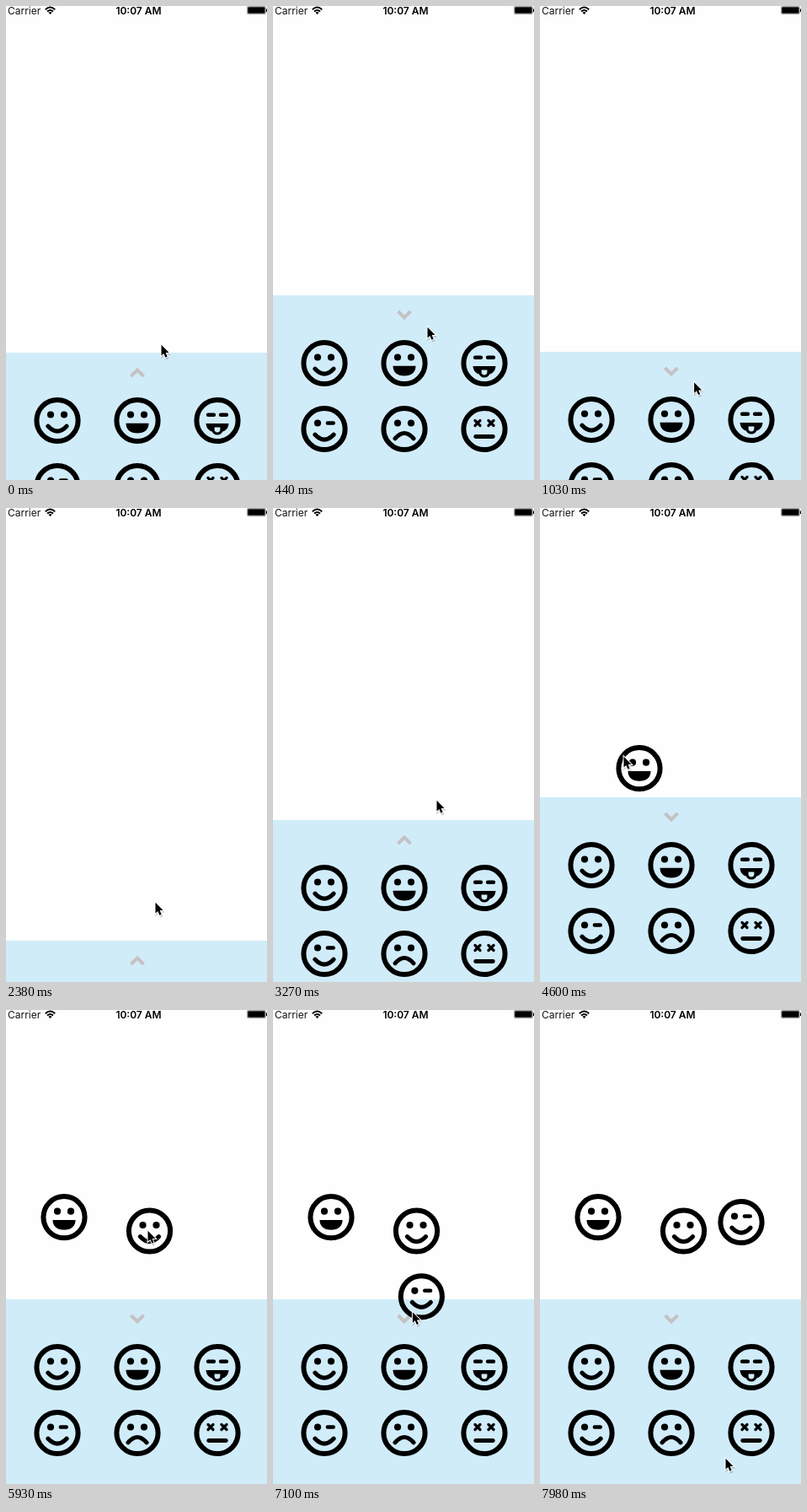
An HTML page that plays this animation: 310 by 562 pixels, repeating every 8000 ms.

```html
<!DOCTYPE html>
<html lang="en">
<head>
<meta charset="utf-8">
<title>Emoji tray</title>
<style>
  html, body { margin: 0; width: 100%; height: 100%; overflow: hidden; background: #fefefe; }
  svg { display: block; width: 310px; height: 562px; }
  text { font: 12px Inter, "Open Sans", sans-serif; }
  .bold { font-weight: 600; text-anchor: middle; }
  .line { fill: none; stroke: #000; stroke-linecap: round; stroke-linejoin: round; }
</style>
</head>
<body>
<svg viewBox="0 0 310 562">
  <defs>
    <circle id="ring" r="24.6" fill="none" stroke="#000" stroke-width="6"/>
    <circle id="eye" r="4.1"/>
    <path id="dash" class="line" stroke-width="4.5" d="M-3.4 0H3.4"/>
    <path id="cross" class="line" stroke-width="3.2" d="M-3-3L3 3M3-3L-3 3"/>
    <path id="curve" class="line" stroke-width="5.2" d="M-11 6.7Q0 18.5 11 6.7"/>
    <g id="eyes"><use href="#eye" x="-8" y="-7"/><use href="#eye" x="8" y="-7"/></g>

    <g id="smile"><use href="#ring"/><use href="#eyes"/><use href="#curve"/></g>
    <g id="grin">
      <use href="#ring"/><use href="#eyes"/>
      <path d="M-13.5 3.2H13.5C13.5 10.5 8.5 15 0 15S-13.5 10.5-13.5 3.2Z"/>
    </g>
    <g id="tongue">
      <use href="#ring"/>
      <use href="#dash" x="-7.5" y="-6.8"/><use href="#dash" x="7.5" y="-6.8"/>
      <path d="M-13.5 3.5H13.5C13 8.5 10.5 12 6.5 13H-6.5C-10.5 12-13 8.5-13.5 3.5Z"/>
      <path d="M-5 6.5H5V10.5A5 5 0 0 1-5 10.5Z" fill="#d1ecf9" stroke="#000" stroke-width="3.2"/>
    </g>
    <g id="wink">
      <use href="#ring"/><use href="#eye" x="-8" y="-7"/><use href="#dash" x="7.3" y="-7"/><use href="#curve"/>
    </g>
    <g id="sad">
      <use href="#ring"/><use href="#eyes"/>
      <path class="line" stroke-width="5" d="M-11 11.3Q0-1.5 11 11.3"/>
    </g>
    <g id="dead">
      <use href="#ring"/>
      <use href="#cross" x="-8" y="-7"/><use href="#cross" x="8" y="-7"/>
      <path class="line" stroke-width="4.8" d="M-10.3 9H10.3"/>
    </g>
  </defs>

  <rect width="310" height="562" fill="#fefefe"/>

  <text x="2" y="10" fill="#111">Carrier</text>
  <path d="M46.8 4.2Q52.5-1 58.2 4.2M49 6.5Q52.5 3.4 56 6.5" fill="none" stroke="#000" stroke-width="1.9"/>
  <path d="M50.4 7.7L52.5 9.9L54.6 7.7Q52.5 6.1 50.4 7.7Z"/>
  <text class="bold" x="157.5" y="10">10:07 AM</text>
  <rect x="286.4" y=".4" width="22" height="9.2" rx="1.5" fill="none" stroke="#888" stroke-width=".8"/>
  <rect x="287.2" y="1.2" width="20.4" height="7.6" rx=".8"/>
  <path d="M309 3.5H310V7H309Z"/>

  <g id="panel">
    <rect width="310" height="562" fill="#d1ecf9"/>
    <path id="chevron" fill="none" stroke="#c4c2c4" stroke-width="4"/>
    <use href="#smile" x="61" y="80.5"/>
    <use href="#grin" x="156" y="80.5"/>
    <use href="#tongue" x="251" y="80.5"/>
    <use href="#wink" x="61" y="158.5"/>
    <use href="#sad" x="156" y="158.5"/>
    <use href="#dead" x="251" y="158.5"/>
  </g>

  <use id="grinCopy" href="#grin"/>
  <use id="smileCopy" href="#smile"/>
  <use id="winkCopy" href="#wink"/>

  <g id="cursor">
    <path d="M0 2V17L4 14L6 18.5L9.5 17L7.5 12.5H12Z" opacity=".2"/>
    <path d="M.5 .8V13.6L3.4 10.9L5.4 15.7L7.6 14.8L5.6 10.1H9.6Z"
          stroke="#fff" stroke-width="2" paint-order="stroke"/>
  </g>
</svg>
<script>
const LOOP = 8000, STEP = 147.8, OPEN = 343, CLOSED = 513;
const el = id => document.getElementById(id);
const ease = p => p * p * (3 - 2 * p);

// Eased legs between resting points; times count screen refreshes.
const panelLegs = [
  { from: 0, to: 3, end: [OPEN] },
  { from: 4, to: 11, end: [CLOSED] },
  { from: 19, to: 23, end: [OPEN] }
];
const cursorLegs = [
  { from: 0, to: 3, end: [183, 380] },
  { from: 4, to: 11, end: [182, 546] },
  { from: 11, to: 16, end: [177, 467] },
  { from: 16, to: 18, end: [178, 530] },
  { from: 19, to: 22, end: [194, 346] },
  { from: 22, to: 26, end: [145, 445] },
  { from: 27, to: 31, end: [99, 294] },
  { from: 31, to: 33, end: [50, 231] },
  { from: 33, to: 36, end: [50, 432] },
  { from: 37, to: 40, end: [168, 261] },
  { from: 40, to: 45, end: [50, 520] },
  { from: 45, to: 50, end: [228, 269] },
  { from: 50, to: 53, end: [205, 525] },
  { from: 53, to: 54, end: [220, 531] }
];
const copies = [
  { node: el('grinCopy'), grab: 28, drop: 33, dx: 19, dy: 14.7 },
  { node: el('smileCopy'), grab: 38, drop: 40, dx: 2.5, dy: 1 },
  { node: el('winkCopy'), grab: 46, drop: 50, dx: 11, dy: -17.5 }
];

function follow(start, legs, step) {
  return legs.reduce((pos, { from, to, end }) => {
    const p = ease(Math.min(1, Math.max(0, (step - from) / (to - from))));
    return pos.map((v, i) => v + (end[i] - v) * p);
  }, start);
}

const panelAt = step => follow([411], panelLegs, step)[0];
const cursorAt = step => follow([184, 401], cursorLegs, step);
const move = (node, x, y) => node.setAttribute('transform', `translate(${x} ${y})`);

function draw(time) {
  const step = Math.floor((time % LOOP + 8) / STEP);
  const pointsUp = step < 3 || (step >= 11 && step < 23);

  move(el('panel'), 0, Math.round(panelAt(step)));
  el('chevron').setAttribute('d', pointsUp ? 'M148.5 28L156 20.5L163.5 28' : 'M148.5 19L156 26.5L163.5 19');
  move(el('cursor'), ...cursorAt(step));

  for (const { node, grab, drop, dx, dy } of copies) {
    const [x, y] = cursorAt(Math.min(step, drop));
    node.style.display = step < grab ? 'none' : '';
    move(node, x + dx, y + dy);
  }
}

const origin = performance.now();
function frame() {
  draw(performance.now() - origin);
  requestAnimationFrame(frame);
}
frame();
</script>
</body>
</html>
```
